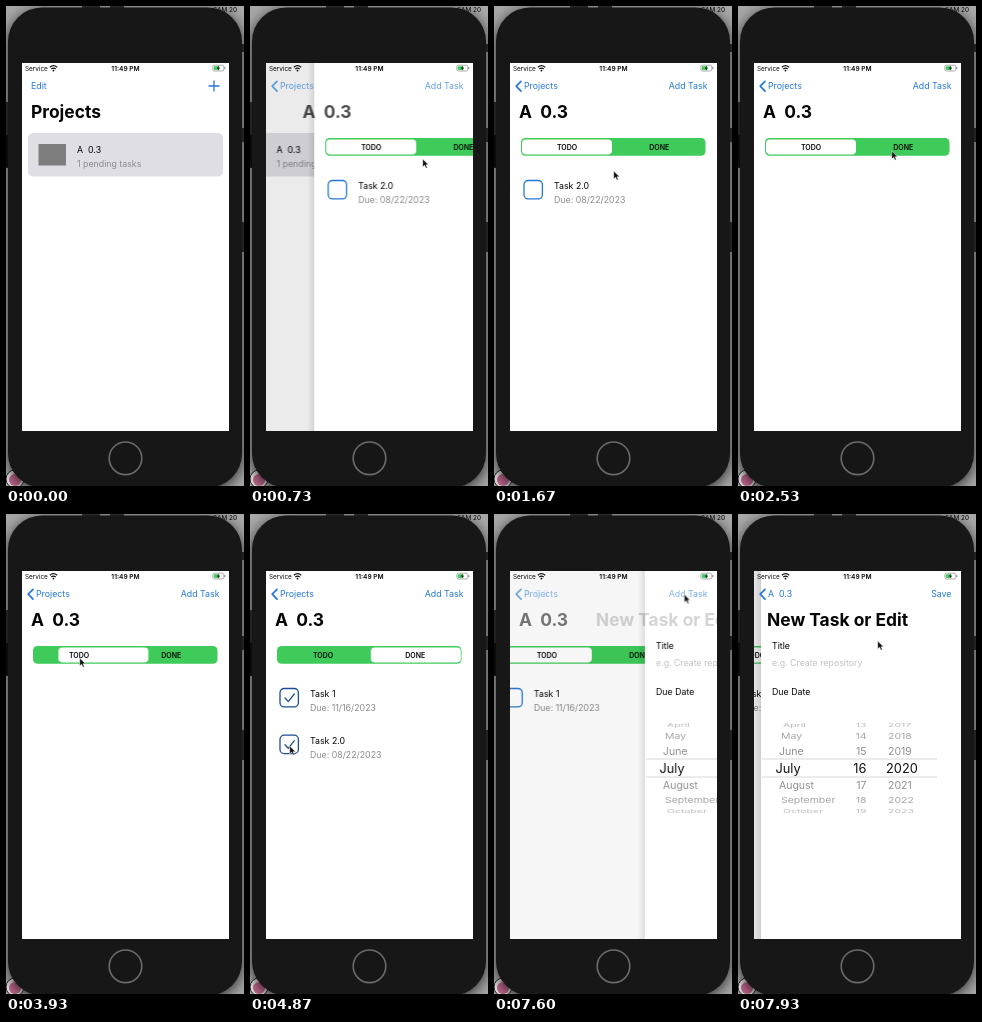
These frames come from a looping animation (238 by 480 pixels, 8 s). An HTML page:

```html
<!DOCTYPE html>
<html lang="en">
<head>
<meta charset="utf-8">
<title>Task list on a phone</title>
<style>
  html, body { margin: 0; width: 100%; height: 100%; overflow: hidden; background: #a8a8a8; }
  svg { display: block; width: 100vw; height: 100vh; }
  text { font: 8.8px Inter, "Open Sans", sans-serif; white-space: pre; fill: #050505; }
  .blue { fill: #2478d8; }
  .gray { fill: #8b8b8e; }
  .hint { fill: #c2c2c6; }
  .title { font-size: 17.4px; font-weight: 700; }
  .segment { font-size: 7px; font-weight: 600; text-anchor: middle; }
  .status { font-size: 6.4px; }
  .clock { font-size: 6.6px; font-weight: 600; text-anchor: middle; }
  .end { text-anchor: end; }
  .line { fill: none; stroke: #2478d8; stroke-width: 1.3; stroke-linecap: round; stroke-linejoin: round; }
  .chevron { stroke-width: 1.7; }
  .checked .line { stroke: #1d4f92; }
  #body { filter: drop-shadow(0 3px 7px rgba(0, 0, 0, .75)); }
</style>
</head>
<body>
<svg viewBox="0 0 238 480">
  <defs>
    <clipPath id="screen"><rect x="16" y="57" width="206.4" height="368"/></clipPath>
    <linearGradient id="shade"><stop stop-opacity="0"/><stop offset="1" stop-opacity=".1"/></linearGradient>
  </defs>

  <g id="desktop">
    <rect width="238" height="480" fill="#a8a8a8"/>
    <path d="M76 0h18v3h-18zM104 0h14v3h-14zM0 96h2v34h-2zM236 38h2v8h-2zM236 122h2v14h-2zM236 216h2v30h-2z" fill="#333"/>
    <text x="207" y="6" class="status">SAM 20</text>
    <circle cx="9" cy="473" r="9" fill="#e8e3e5" stroke="#222"/>
    <circle cx="9" cy="474" r="6" fill="#c0688f"/>
  </g>

  <rect y="129" width="4" height="33" rx="1" fill="#111"/>
  <rect id="body" x="2" y="1.5" width="234" height="480" rx="34" fill="#171717"/>
  <circle cx="119.5" cy="452.3" r="16.3" fill="#161616" stroke="#6a6a6a" stroke-width="1.6"/>

  <g clip-path="url(#screen)">
    <g id="projects">
      <rect x="16" y="57" width="207" height="369" fill="#fff"/>
      <rect x="22" y="127" width="195" height="43.5" rx="5" fill="#dfdee5"/>
      <rect x="32.5" y="138" width="27.5" height="21.5" fill="#7e7e7e"/>
      <text x="71" y="147">A  0.3</text>
      <text x="71" y="161" class="gray">1 pending tasks</text>
      <rect id="dimProjects" x="16" y="57" width="269" height="369"/>
    </g>

    <g id="detail">
      <rect x="9" y="57" width="7" height="369" fill="url(#shade)"/>
      <rect x="16" y="57" width="207" height="369" fill="#fff"/>
      <rect x="27" y="132" width="184.5" height="17.8" rx="4.6" fill="#3ecb5a"/>
      <rect id="thumb" y="133.4" width="90" height="15" rx="3.8" fill="#fff"/>
      <text x="73" y="143.5" class="segment">TODO</text>
      <text x="165.3" y="143.5" class="segment">DONE</text>
      <g id="tasks"></g>
      <rect id="dimDetail" x="16" y="57" width="269" height="369"/>
    </g>

    <g id="editor">
      <rect x="9" y="57" width="7" height="369" fill="url(#shade)"/>
      <rect x="16" y="57" width="207" height="369" fill="#fff"/>
      <text x="27" y="135">Title</text>
      <text x="27" y="152" class="hint">e.g. Create repository</text>
      <text x="27" y="181">Due Date</text>
      <path d="M17 245h175M17 263h175" stroke="#cfcfd2" stroke-width=".8"/>
      <g id="wheel"></g>
    </g>

    <g id="projectsBar">
      <text x="25" y="83.2" class="blue">Edit</text>
      <path d="M203 80h10M208 75v10" class="line"/>
      <text x="25" y="111.8" class="title">Projects</text>
    </g>
    <g id="detailBar">
      <path d="M27 75.3l-4.8 4.9 4.8 4.9" class="line chevron"/>
      <text x="30" y="83.2" class="blue">Projects</text>
      <text x="213.5" y="83.2" class="blue end">Add Task</text>
      <text id="detailTitle" x="25" y="111.8" class="title">A  0.3</text>
    </g>
    <g id="editorBar">
      <path d="M27 75.3l-4.8 4.9 4.8 4.9" class="line chevron"/>
      <text x="30" y="83.2" class="blue">A  0.3</text>
      <text x="213.5" y="83.2" class="blue end">Save</text>
      <text id="editorTitle" x="25" y="111.8" class="title">New Task or Edit</text>
    </g>

    <text x="19" y="64.8" class="status">Service</text>
    <path d="M43.8 61.2q3.7-3.2 7.4 0M45.3 63q2.2-1.8 4.4 0" fill="none" stroke="#111" stroke-width="1.2"/>
    <circle cx="47.5" cy="64.6" r=".9"/>
    <text x="119.5" y="64.9" class="clock">11:49 PM</text>
    <rect x="206.8" y="59.2" width="11" height="5.8" rx="1.6" fill="#fff" stroke="#777" stroke-width=".6"/>
    <rect x="207.8" y="60.2" width="5.6" height="3.8" rx=".8" fill="#45c95f"/>
    <path d="M218.8 61.2v1.8" stroke="#777"/>
    <path d="M212.8 59.6l-2 2.8h1.6l-.6 2.3 2.2-2.9h-1.6z" fill="#111"/>
  </g>

  <path id="cursor" d="M.7 0v8l1.9-1.7 1.3 2.9 1.4-.6-1.3-2.8h2.5z" fill="#111" stroke="#fff" stroke-width=".5"/>
</svg>
<script>
  const LOOP = 8000;
  const PAGE = 207;
  const OPEN_DETAIL = 500, OPEN_EDITOR = 7500;
  const byId = id => document.getElementById(id);
  const shift = (x, y = 0) => `translate(${x}px, ${y}px)`;

  // steps: [time, value, easing until the next step]
  function track(id, prop, steps) {
    const lead = steps[0][0] > 0 ? [[0, steps[0][1]]] : [];
    const all = [...lead, ...steps, [LOOP, steps.at(-1)[1]]];
    byId(id).animate(
      all.map(([t, v, easing = 'linear']) => ({ offset: t / LOOP, [prop]: v, easing })),
      { duration: LOOP, iterations: Infinity });
  }

  // spans: [from, to, fade-out time]
  function show(id, ...spans) {
    const steps = spans[0][0] > 0 ? [[0, 0, 'steps(1)']] : [];
    for (const [from, to, fade = 0] of spans) {
      steps.push([from, 1, 'steps(1)']);
      if (fade) steps.push([to - fade, 1]);
      steps.push([to, 0, 'steps(1)']);
    }
    track(id, 'opacity', steps);
  }

  // Critically damped slide used by page changes
  function spring(start, from, to, format = v => v) {
    const limit = Math.min(700, LOOP - start);
    return Array.from({ length: limit / 50 + 1 }, (_, i) => {
      const t = i * 50, kt = t * 0.0122;
      const rest = i === 14 ? 0 : (1 + kt) * Math.exp(-kt);
      return [start + t, format(to + (from - to) * rest)];
    });
  }

  function addTask(id, name, due, checked) {
    const tick = checked ? '<path class="line" d="M35 184l3.3 3.6 6-7.6"/>' : '';
    byId('tasks').insertAdjacentHTML('beforeend', `
      <g id="${id}" class="${checked ? 'checked' : ''}">
        <rect class="line" x="30" y="174.5" width="18.4" height="18.4" rx="4.2"/>${tick}
        <text x="60" y="183">${name}</text>
        <text x="60" y="197" class="gray">Due: ${due}</text>
      </g>`);
  }

  function buildWheel() {
    const months = ['April', 'May', 'June', 'July', 'August', 'September', 'October'];
    const tones = ['#111', '#8e8e8e', '#a4a4a4', '#bcbcbc'];
    byId('wheel').innerHTML = months.map((month, i) => {
      const k = i - 3, far = Math.abs(k), angle = k * 0.345;
      const size = far ? 10.5 : 12.8;
      const style = `style="font-size:${size}px;fill:${tones[far]}"`;
      const y = 254.1 + 50 * Math.sin(angle), base = size * 0.36;
      return `<g transform="translate(0 ${y}) scale(1 ${Math.cos(angle)})">
        <text x="${far ? 32 + 2 * far : 30.5}" y="${base}" ${style}>${month}</text>
        <text x="121.5" y="${base}" class="end" ${style}>${16 + k}</text>
        <text x="${far ? 143 : 141}" y="${base}" ${style}>${2020 + k}</text>
      </g>`;
    }).join('');
  }

  addTask('secondTodo', 'Task 2.0', '08/22/2023', false);
  addTask('firstDone', 'Task 1', '11/16/2023', true);
  addTask('secondDone', 'Task 2.0', '08/22/2023', true);
  addTask('firstTodo', 'Task 1', '11/16/2023', false);
  buildWheel();

  // Page changes
  const BACK = -0.28 * PAGE;
  show('detail', [OPEN_DETAIL, LOOP]);
  show('editor', [OPEN_EDITOR, LOOP]);
  track('projects', 'transform', spring(OPEN_DETAIL, 0, BACK, shift));
  track('detail', 'transform', [
    ...spring(OPEN_DETAIL, PAGE, 0, shift), ...spring(OPEN_EDITOR, 0, BACK, shift)]);
  track('editor', 'transform', spring(OPEN_EDITOR, PAGE, 0, shift));
  track('dimProjects', 'opacity', spring(OPEN_DETAIL, 0, 0.1));
  track('dimDetail', 'opacity', spring(OPEN_EDITOR, 0, 0.1));
  track('detailTitle', 'transform', spring(OPEN_DETAIL, 118, 0, shift));
  track('editorTitle', 'transform', spring(OPEN_EDITOR, 118, 0, shift));
  const fadeOut = t => [[t, 1], [t + 220, 0]];
  const fadeIn = t => [[t + 60, 0], [t + 300, 1]];
  track('projectsBar', 'opacity', fadeOut(OPEN_DETAIL));
  track('detailBar', 'opacity', [...fadeIn(OPEN_DETAIL), ...fadeOut(OPEN_EDITOR)]);
  track('editorBar', 'opacity', fadeIn(OPEN_EDITOR));

  // TODO / DONE switch
  const TODO = shift(28), DONE = shift(120.8);
  const flip = (t, from, to) => [[t, from, 'ease-in-out'], [t + 200, to]];
  track('thumb', 'transform', [
    ...flip(2620, TODO, DONE), ...flip(3802, DONE, TODO),
    ...flip(4480, TODO, DONE), ...flip(6464, DONE, TODO)]);

  // Task rows
  show('secondTodo', [0, 2220, 220]);
  show('firstDone', [2640, 3800], [4490, 5800, 200]);
  show('secondDone', [2640, 3800], [4490, 6470]);
  show('firstTodo', [6470, LOOP]);
  track('secondDone', 'transform', [[5600, shift(0, 46.7), 'ease-in-out'], [5900, shift(0)]]);

  show('cursor', [70, LOOP]);
  const stops = [
    [0, 172, 153], [1530, 172, 153], [1850, 39, 183], [2150, 39, 183],
    [2530, 153, 145], [2700, 153, 145], [2950, 165, 162], [3270, 150, 150],
    [3530, 73, 144], [4130, 73, 144], [4370, 160, 143], [4550, 160, 143],
    [4870, 39, 232], [5000, 39, 232], [5350, 39, 182], [5750, 39, 182],
    [6330, 97, 141], [6650, 97, 141], [7270, 177, 92], [7420, 190, 80],
    [7580, 190, 80], [7900, 139, 127]];
  track('cursor', 'transform', stops.map(([t, x, y]) => [t, shift(x, y), 'ease-in-out']));
</script>
</body>
</html>
```
